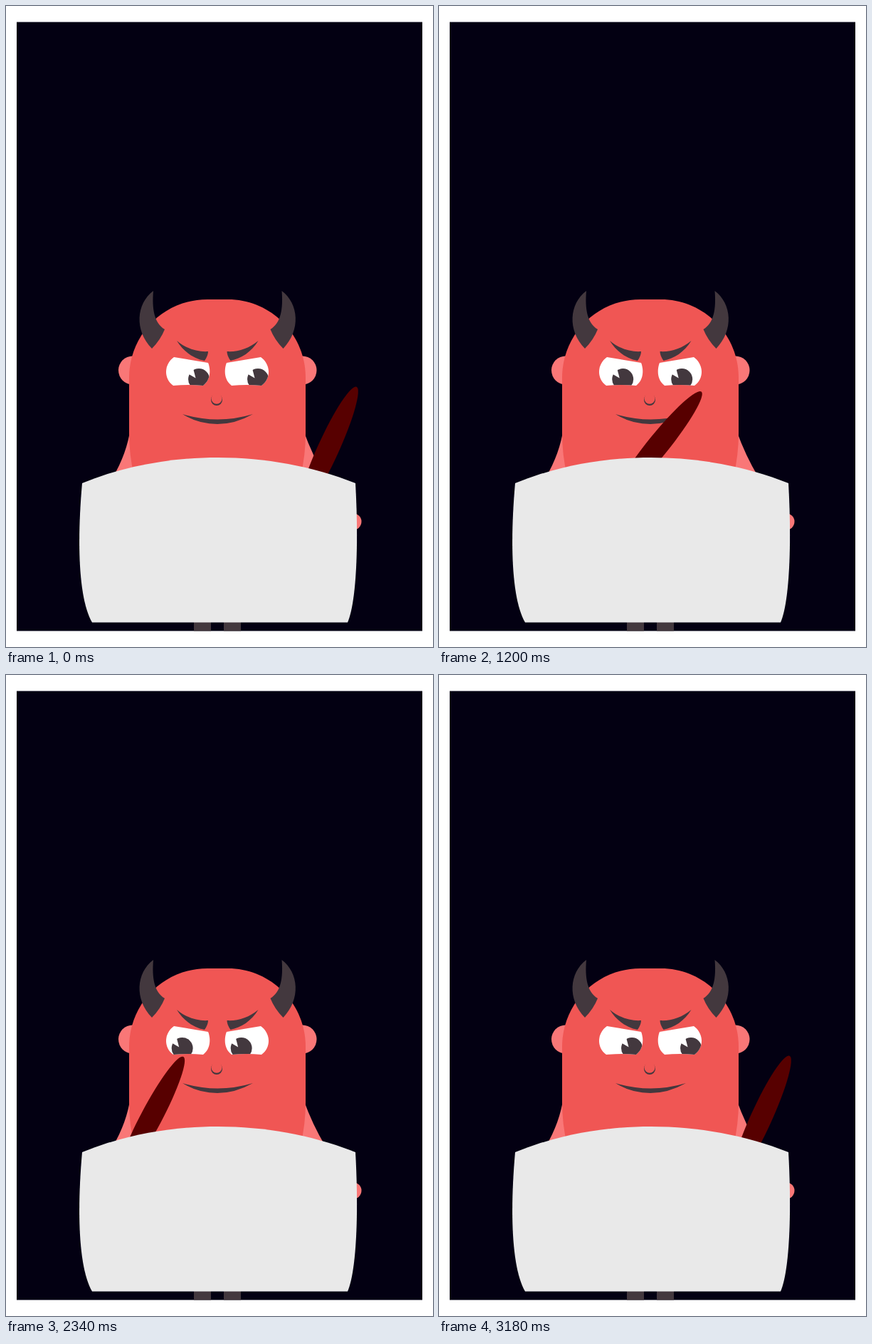
Write an HTML page that moves like this. It is 600 px wide and 900 px high and loops after 3210 ms.

```html
<!DOCTYPE html>
<html lang="en">
<head>
<meta charset="utf-8">
<title>Devil behind a board</title>
<style>
  html, body { margin: 0; width: 100%; height: 100%; overflow: hidden; background: #fff; }
  svg { display: block; width: 600px; height: 900px; }
  .skin { fill: #f05654; }
  .pale { fill: #f97777; }
  .dark { fill: #43383e; }
  .white { fill: #fff; }
</style>
</head>
<body>
<svg viewBox="0 0 600 900">
  <defs>
    <path id="horn" d="M207 400C205 425 208 445 223 454Q217 469 205 481C180 455 183 418 207 400Z"/>
    <path id="brow" d="M240 470C253 481 269 486 284 485Q284 491 279 498C264 495 250 486 240 470Z"/>
    <path id="eye" d="M236 493C222 503 221 523 235 533Q256 531 277 533C289 524 287 508 284 501Z"/>
    <g id="pupil">
      <circle class="dark" r="15"/>
      <path class="white" d="M-17-9L-8-15L-4.5-1.5L-14-7Z"/>
    </g>
    <clipPath id="leftEye"><use href="#eye"/></clipPath>
    <clipPath id="rightEye"><use href="#eye" transform="matrix(-1 0 0 1 594 0)"/></clipPath>
  </defs>

  <rect x="15" y="22.5" width="570" height="855" fill="#030012"/>
  <path class="dark" d="M264 860h24v17.5h-24zM306 860h24v17.5h-24z"/>

  <!-- body -->
  <g class="pale">
    <circle cx="178" cy="511.500" r="20"/>
    <circle cx="416.500" cy="511.500" r="20"/>
    <circle cx="488" cy="724" r="11.500"/>
    <path d="M175 592Q170 628 150 662H240V592ZM418 596Q430 630 449 662H360V592Z"/>
  </g>
  <path class="skin" d="M173 522C173 461 222 412 283 412H312C372 412 421 461 421 522V600Q421 630 414 660H180Q173 630 173 600Z"/>

  <!-- face -->
  <g class="dark">
    <use href="#horn"/>
    <use href="#horn" transform="matrix(-1 0 0 1 594.500 0)"/>
    <use href="#brow"/>
    <use href="#brow" transform="matrix(-1 0 0 1 594.500 0)"/>
    <circle cx="296" cy="553" r="8"/>
    <path d="M248 573Q297 588 347 573Q322 587 297 587Q270 587 248 573Z"/>
  </g>
  <circle class="skin" cx="296" cy="551.200" r="7.500"/>
  <g class="white">
    <use href="#eye"/>
    <use href="#eye" transform="matrix(-1 0 0 1 594 0)"/>
  </g>
  <g clip-path="url(#leftEye)"><use id="leftPupil" href="#pupil"/></g>
  <g clip-path="url(#rightEye)"><use id="rightPupil" href="#pupil"/></g>

  <ellipse id="pen" cy="44" rx="15" ry="96" fill="#570000"/>
  <path d="M107 670C225 622 370 622 491 670C496 760 492 838 480 865.500H121C103 835 99 760 107 670Z" fill="#e9e9e9"/>
</svg>
<script>
  const LOOP = 3210, STEP = 30, TURN = 1590;
  // time, x of the pen's pivot
  const sweep = [[0, 471], [480, 313], [795, 211], [1200, 336], [1500, 449], [1590, 475]];
  const byId = id => document.getElementById(id);
  const move = (id, value) => byId(id).setAttribute('transform', value);

  function sweepX(t) {
    const i = Math.max(1, sweep.findIndex(([end]) => t <= end));
    const [t0, x0] = sweep[i - 1], [t1, x1] = sweep[i];
    return x0 + (x1 - x0) * (t - t0) / (t1 - t0);
  }

  // quick sway of the pen, in degrees
  const sway = t => 32.5 - 11 * Math.cos(2 * Math.PI * (t - 478) / 166);

  function draw(ms) {
    const clock = Math.floor(ms % LOOP / STEP) * STEP;
    const t = TURN - Math.abs(TURN - clock);   // plays forward, then back
    const x = sweepX(t);
    const gaze = 226.3 + 0.095 * x;            // eyes follow the pen
    move('pen', `translate(${x} 582) rotate(${sway(t)})`);
    move('leftPupil', `translate(${gaze} 524)`);
    move('rightPupil', `translate(${gaze + 83} 524)`);
  }

  const start = performance.now();
  function tick() {
    draw(performance.now() - start);
    requestAnimationFrame(tick);
  }
  tick();
</script>
</body>
</html>
```
